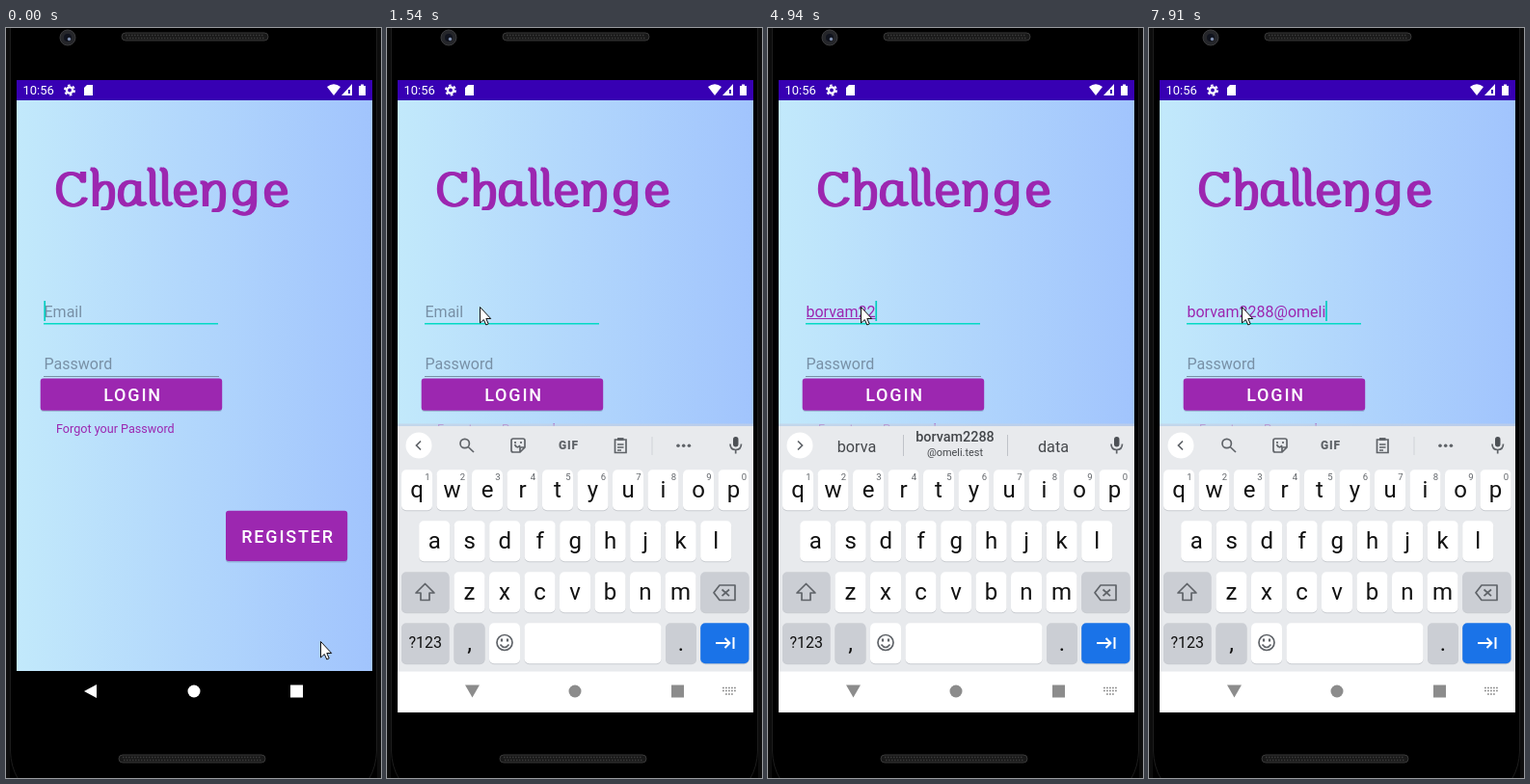
These frames come from a looping animation (389 by 778 pixels, 8 s). An HTML page:

```html
<!DOCTYPE html>
<html lang="en">
<head>
<meta charset="utf-8">
<title>Login screen</title>
<style>
html, body { margin: 0; width: 100%; height: 100%; overflow: hidden; background: #000 }
svg { display: block; font-family: Roboto, "Open Sans", sans-serif }
.mid { text-anchor: middle }
.btn { font-size: 18px; font-weight: 500; letter-spacing: 1.8px; fill: #fff }
.line { fill: none; stroke: #5f6368; stroke-width: 1.7 }
.hint { font-size: 16px; fill: #7890a6 }
</style>
</head>
<body>
<svg width="389" height="778" viewBox="0 0 389 778">
  <defs>
    <linearGradient id="sky"><stop stop-color="#c2e9fb"/><stop offset="1" stop-color="#a1c4fd"/></linearGradient>
    <clipPath id="screen"><path d="M11 54H380V710H11z"/></clipPath>
    <g id="speaker">
      <rect width="152" height="8" rx="4" fill="#191919" stroke="#393939"/>
      <path d="M4 2.5H148M5 5.5H148" stroke="#3b3b3b" stroke-width="1.5" stroke-dasharray="1.5 1.5"/>
    </g>
    <path id="e" d="M4 172.500H21C21 158 3 157 3 172C3 188 18 188 23 180"/>
    <path id="l" d="M0 147Q4 148 4 153V176C4 184 7 186 10 182"/>
    <g id="title" fill="none" stroke="#9c27b0" stroke-width="3.4" stroke-linejoin="round">
      <path d="M80 150V160C76 149 55 147 55 168C55 188 77 189 82 177"/>
      <path d="M89 147Q93 148 93 153V186M93 171C97 159 110 157 110 172C110 184 108 190 100 188"/>
      <path d="M137 164C131 158 119 159 119 174C119 189 133 187 137 175M137 160V177C137 184 140 186 144 182"/>
      <use href="#l" x="148"/><use href="#l" x="161"/><use href="#e" x="174"/>
      <path d="M203 161Q207 161 207 166V186M207 171C211 158 225 157 225 172C225 185 224 192 215 190"/>
      <path d="M257 164C251 158 238 159 238 173C238 188 253 186 257 175M257 160V181C257 196 245 196 237 190"/>
      <use href="#e" x="268"/>
    </g>
    <path id="keysIcon" d="M-7-3H8M-7 0H8M-4 3.500H5" stroke-width="1.500" stroke-dasharray="1.800 1.200"/>
  </defs>

  <!-- phone body -->
  <path d="M0 0H389V778H0z"/>
  <path d="M0 0H4V778H0zM385 0H389V778H385z" fill="#0d0d0d"/>
  <path d="M4.500 0V750Q5 766 12 778M384.500 0V750Q384 766 377 778" fill="none" stroke="#1c1c1c"/>
  <use href="#speaker" x="120" y="5"/><use href="#speaker" x="117" y="754"/>
  <circle cx="64" cy="10" r="8" fill="#25262a" stroke="#3b3b3d"/>
  <circle cx="64" cy="10" r="4" fill="#10131d"/><circle cx="65.500" cy="11.500" r="1.700" fill="#8090b0"/>

  <g clip-path="url(#screen)">
    <path d="M11 54H380V667H11z" fill="url(#sky)"/>
    <path d="M11 54H380V75H11z" fill="#3700b3"/>
    <g fill="#fff">
      <text x="17.500" y="69.400" font-size="13">10:56</text>
      <circle cx="66" cy="64.500" r="3.100" fill="none" stroke="#fff" stroke-width="2.400"/>
      <circle cx="66" cy="64.500" r="5" fill="none" stroke="#fff" stroke-width="2" stroke-dasharray="2.600 2.636"/>
      <path d="M84 59H90V70H81V62z"/>
      <path d="M333 61Q340 55.500 347 61L340 70zM359 58V70H348zM366 60H368V58.500H371V60H373V70H366z"/>
      <path d="M355 64H357V68H355z" fill="#3700b3"/>
    </g>
    <!-- broad-nib lettering: a thin pen repeated sideways -->
    <g role="img" aria-label="Challenge" transform="translate(0 -1)">
      <use href="#title" x="-1.500"/><use href="#title"/><use href="#title" x="1.500"/>
    </g>

    <text id="email" class="hint" x="39.500" y="299.700"></text>
    <path id="underline" stroke="#9c27b0"/>
    <path d="M39 306.800H220" stroke="#03dac5" stroke-width="1.600"/>
    <path id="caret" d="M0 283V304" stroke="#03cdbf" stroke-width="1.700"/>
    <text class="hint" x="39.500" y="354.200">Password</text>
    <path d="M39 361.500H221" stroke="#7890a6"/>
    <g fill="#506080" opacity=".3"><rect x="36" y="365" width="188" height="33" rx="3"/><rect x="228" y="502" width="126" height="52.500" rx="3"/></g>
    <g fill="#9c27b0">
      <rect x="35.700" y="363.500" width="188.500" height="33.200" rx="3"/><rect x="228" y="500.700" width="126.200" height="52.300" rx="3"/>
      <text x="52" y="420" font-size="12.600">Forgot your Password</text>
    </g>
    <text class="btn mid" x="131.500" y="387">LOGIN</text>
    <text class="btn mid" x="292.500" y="533.500">REGISTER</text>

    <path d="M11 667H380V710H11z"/>
    <g id="board">
      <path d="M11 410.500H380V414H11z" fill="#c3d0e4" opacity=".7"/>
      <path d="M11 413H380V720H11z" fill="#e8eaed"/>
      <g id="keys"></g>
      <circle cx="33" cy="433" r="13.500" fill="#fff"/>
      <path id="chevron" class="line"/>
      <g id="tools" class="line">
        <circle cx="80.700" cy="431" r="4.700"/><path d="M84.200 434.500L90 440"/>
        <path d="M131 426H141Q143 426 143 428V435L138 440H131Q129 440 129 438V428Q129 426 131 426M143 435H138V440M132.500 432Q135 437 138 433"/>
        <path d="M133 429V431M139 429V431M236.500 427H248V440.500H236.500zM239 432H245.500M239 435H245.500M239 438H243"/>
        <path d="M239 426.500H245.500" stroke-width="3"/>
        <path d="M275 424V443" stroke="#d0d3d8" stroke-width="1"/>
        <text class="mid" x="188.500" y="437.300" font-size="12" font-weight="900" fill="#5f6368" stroke="none" letter-spacing=".8">GIF</text>
        <g fill="#5f6368" stroke="none"><circle cx="302" cy="433.300" r="1.800"/><circle cx="307.700" cy="433.300" r="1.800"/><circle cx="313.400" cy="433.300" r="1.800"/></g>
      </g>
      <g id="words" class="mid" fill="#44474b">
        <path d="M140.500 422V444M248.500 422V444" stroke="#bfc3c9"/>
        <text id="left" x="92" y="439.500" font-size="16.200"></text>
        <text id="middle" x="194" y="439.500" font-size="16.200"></text>
        <text id="right" x="296" y="439.500" font-size="16.200"></text>
        <g id="address"><text x="194" y="428.500" font-size="14.400" font-weight="500">borvam2288</text><text x="194" y="443.700" font-size="10.900">@omeli.test</text></g>
      </g>
      <rect x="359" y="424" width="5.500" height="10.500" rx="2.700" fill="#4d5156"/>
      <path class="line" d="M356 431.500Q356 437.500 361.700 437.500T367.500 431.500M361.700 437V441.500"/>
    </g>
    <path id="navBar" d="M11 667.500H380V710H11z" fill="#fff"/>
    <g id="nav">
      <path id="back"/><circle cx="195" cy="688" r="6.500"/><path d="M295 681.500H308V694.500H295z"/>
      <use id="switcher" href="#keysIcon" x="355" y="687.500"/>
    </g>
  </g>
  <path id="mouse" d="M0 0V16.500L3.800 13L6.300 18.500L8.700 17.400L6.300 12H11.200z" fill="#fff" stroke="#111" stroke-linejoin="round"/>
</svg>
<script>
const $ = id => document.getElementById(id);
const LOOP = 8000, LOGIN = "borvam2288@omeli";

// Step tracks: [start time, value]
const mouse = [[0, [326, 636]], [130, [296, 560]], [280, [205, 400]], [440, [122, 275]], [590, [108, 259]],
  [900, [101, 280]], [1050, [96, 289]]];
const caretOn = [[0, 1], [280, 0], [590, 1], [1360, 0], [1840, 1], [5870, 0], [6340, 1]];
const typed = [0, 2290, 2930, 3070, 3540, 3850, 4160, 4620, 4940, 5250, 5410, 6340, 6800, 7120, 7440, 7590, 7910]
  .map((time, count) => [time, count]);
const strip = [[0, null], [2450, ["b", "but", "be"]], [2930, ["bo", "", "data"]], [3070, ["bor", "", "data"]],
  [3850, ["borv", "", "data"]], [4000, ["borva", "", "data"]], [5090, null]];
const boardDrop = [[0, 300], [1360, 48], [1540, 0]];

const at = (track, t) => track.findLast(([start]) => t >= start)[1];
const show = (id, on) => $(id).setAttribute("display", on ? "inline" : "none");
const set = (id, attrs) => { for (const k in attrs) $(id).setAttribute(k, attrs[k]); };

function key(x, y, w, label = "", fill = "#fff", size = 24) {
  const rect = (dy, color) => `<rect x="${x}" y="${y + dy}" width="${w}" height="42" rx="5" fill="${color}"/>`;
  return rect(1, "#c8cbd0") + rect(0, fill) +
    `<text class="mid" x="${x + w / 2}" y="${y + (size < 20 ? 26 : 28.4)}" font-size="${size}" fill="#111">${label}</text>`;
}

function keyboard() {
  const grey = "#cbced4", pitch = 36.5, top = 458.3, row = i => top + i * 53;
  let out = "";
  [["qwertyuiop", 15], ["asdfghjkl", 33.2], ["zxcvbnm", 69.5]].forEach(([letters, x0], r) =>
    [...letters].forEach((c, i) => {
      const x = x0 + i * pitch;
      out += key(x, row(r), 32, c);
      if (!r) out += `<text class="mid" x="${x + 27}" y="469" font-size="9.500" fill="#5f6368">${(i + 1) % 10}</text>`;
    }));
  out += key(15, row(2), 49.5, "", grey) + key(325.2, row(2), 50.3, "", grey) +
    key(15, row(3), 49.5, "?123", grey, 16) + key(69.5, row(3), 32, ",", grey) + key(106, row(3), 32) +
    key(142.5, row(3), 142) + key(289, row(3), 32, ".", grey) + key(325.2, row(3), 50.3, "", "#1a73e8");
  return out + `<g class="line" stroke-linejoin="round">
    <path d="M39.500 576.500L49 586H44V593.500H35V586H30z"/>
    <path d="M345 578H361V593.500H345L339 585.700zM347.500 582.500L355 589.200M355 582.500L347.500 589.200"/>
    <circle cx="122" cy="637.500" r="8"/><path d="M117.500 639.500Q122 645.500 126.500 639.500"/>
    <path d="M119 633.500V636.500M125 633.500V636.500" stroke-width="2.200"/>
    <path d="M341 638H355M350.500 633L355.500 638L350.500 643M359.500 632V644" stroke="#fff" stroke-width="2"/></g>`;
}

function draw(t) {
  const [x, y] = at(mouse, t);
  set("mouse", { transform: `translate(${x + .5} ${y + .5})` });

  const text = LOGIN.slice(0, at(typed, t)), words = at(strip, t);
  $("email").textContent = text || "Email";
  $("email").style.fill = text ? "#9c27b0" : "";
  const end = 40 + (text ? $("email").getComputedTextLength() : 0);
  set("caret", { transform: `translate(${end + .2} 0)` });
  show("caret", at(caretOn, t));
  set("underline", { d: `M40 301.500H${end}` });
  show("underline", text && t < 5090);

  show("tools", !words);
  show("words", words);
  set("chevron", { d: words ? "M31 428.500L35.500 433L31 437.500" : "M35 428.500L30.500 433L35 437.500" });
  if (words) {
    ["left", "middle", "right"].forEach((id, i) => $(id).textContent = words[i]);
    show("address", !words[1]);
  }

  const drop = at(boardDrop, t), open = drop === 0, sliding = drop === 48;
  set("board", { transform: `translate(0 ${drop})` });
  show("board", drop < 300);
  show("navBar", open);
  const color = drop === 300 ? "#fff" : open ? "#8c8c8c" : "#b0b0b0";
  set("nav", { fill: color, stroke: "none" });
  set("back", { d: open ? "M81 681.500H96L88.500 694.500z" : "M81 688L94 681V695z" });
  set("switcher", { stroke: color });
  show("switcher", t >= 1210 && !sliding);
}

$("keys").innerHTML = keyboard();
(function tick() {
  draw(performance.now() % LOOP);
  requestAnimationFrame(tick);
})();
</script>
</body>
</html>
```
